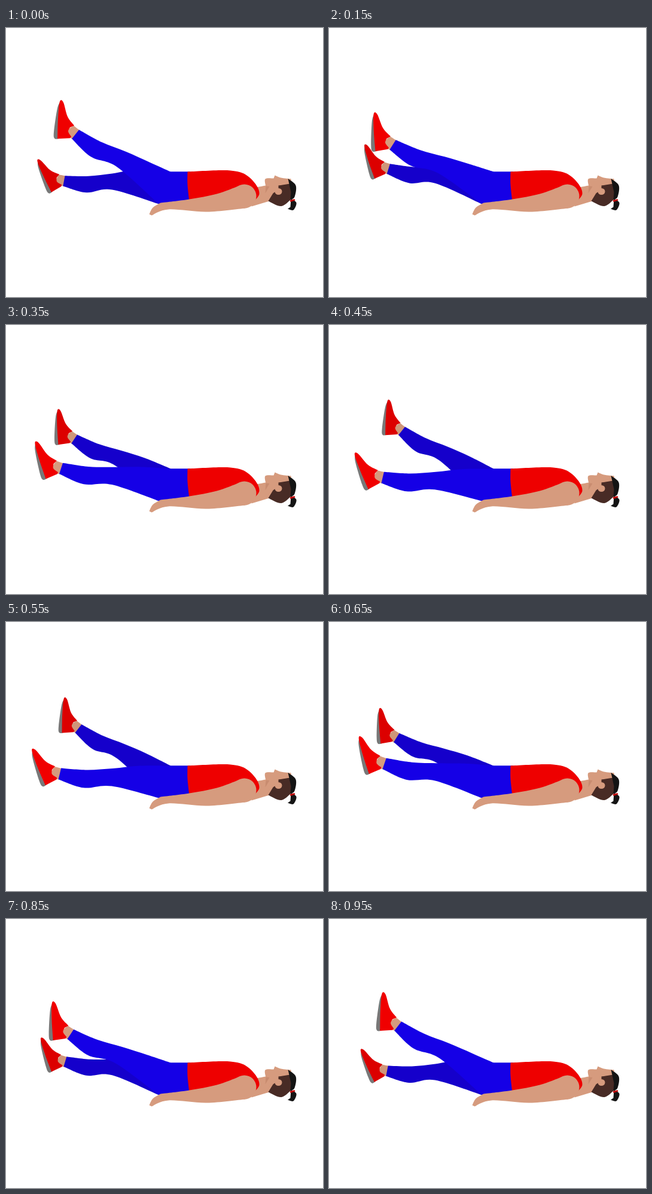
An HTML page with a canvas for the animation above (1000 ms loop, 530 px wide and 450 px high).

```html
<!DOCTYPE html>
<html lang="en">
<head>
<meta charset="utf-8">
<title>Flutter kicks</title>
<style>
html, body { margin: 0; width: 100%; height: 100%; overflow: hidden; background: #fff; }
canvas { display: block; }
</style>
</head>
<body>
<canvas id="stage" width="530" height="450"></canvas>
<script>
const ctx = document.getElementById('stage').getContext('2d');
const LOOP = 1000, STEP = 50;
const SKIN = '#d69b7e', RED = '#ee0000', BLACK = '#141414', HAIR = '#482b25';

const near = { x: 276, y: 275, scale: 1, pants: '#1500e6', shoe: '#f00000', skin: SKIN };
const far = { x: 268, y: 266, scale: .915, pants: '#1500cb', shoe: '#dc0000', skin: '#cf9679' };

// 1 = near leg up, -1 = near leg down
function swing(t) {
  const p = 2 * Math.PI * (t + 7) / LOOP;
  return Math.cos(p) + .02 * Math.cos(3 * p) - .03;
}

// Fills a closed shape made of smooth runs that meet in corners
function fill(color, ...runs) {
  ctx.beginPath();
  for (const run of runs) {
    ctx.lineTo(...run[0]);
    for (let i = 0; i < run.length - 1; i++) {
      const b = run[i], c = run[i + 1], a = run[i - 1] || b, d = run[i + 2] || c;
      ctx.bezierCurveTo(b[0] + (c[0] - a[0]) / 6, b[1] + (c[1] - a[1]) / 6,
        c[0] - (d[0] - b[0]) / 6, c[1] - (d[1] - b[1]) / 6, c[0], c[1]);
    }
  }
  ctx.fillStyle = color;
  ctx.fill();
}

function oval(color, x, y, rx, ry = rx) {
  ctx.beginPath();
  ctx.ellipse(x, y, rx, ry, 0, 0, 2 * Math.PI);
  ctx.fillStyle = color;
  ctx.fill();
}

// Foot and leg are given relative to the hip joint, with the leg raised
function drawFoot(leg, turn) {
  ctx.save();
  ctx.translate(leg.x, leg.y);
  ctx.rotate(turn);
  ctx.scale(leg.scale, leg.scale);
  fill(leg.skin, [[-163, -113], [-153, -105]], [[-165, -90], [-173, -97], [-172, -107]]);
  fill('#787878', [[-184, -154], [-190, -142], [-196, -103], [-195, -91.5], [-188, -91]]);
  fill(leg.shoe, [[-190, -91], [-189, -125], [-186, -153], [-180, -152], [-173, -128], [-162, -113]],
    [[-169, -110], [-172, -103], [-167, -94.5]], [[-169, -92]]);
  ctx.restore();
}

function drawLeg(leg, degrees) {
  const turn = degrees * Math.PI / 180;
  drawFoot(leg, turn);
  // Points close to the hip follow the rotation less
  const place = ([x, y]) => {
    const r = Math.hypot(x, y), a = Math.atan2(y, x) + turn * Math.min(1, r / 75);
    return [leg.x + leg.scale * r * Math.cos(a), leg.y + leg.scale * r * Math.sin(a)];
  };
  const top = [[-154, -106], [-116, -85], [-76, -69], [-36, -51]].map(place);
  const bottom = [[-90, -43], [-134, -60.5], [-166, -91]].map(place);
  fill(leg.pants, [...top, [275, 240]], [[308, 240]], [[308, 290]], [[255, 294], ...bottom]);
}

function drawHead() {
  fill(SKIN, [[412, 267], [434, 263]], [[446, 274], [440, 289]], [[410, 298]]);
  fill(SKIN, [[434, 265], [433, 252], [447, 251]], [[449, 246], [459, 250], [476, 252]],
    [[480, 280]], [[440, 284]]);
  fill('#c88c70', [[434, 264], [440, 264.5]], [[433, 276]]);
  fill(HAIR, [[455, 263], [475, 260]], [[478, 284], [460, 297.5], [438, 289]], [[446, 276], [455, 270]]);
  oval(SKIN, 455, 273, 6, 5.5);
  fill(BLACK, [[471, 251.5], [484, 263], [482, 282], [475, 287]], [[476, 274], [471, 251.5]]);
  fill(BLACK, [[476, 285], [485, 292], [480, 304], [470.5, 302]], [[475, 299], [476, 285]]);
  fill('#c40c0c', [[474, 287.5]], [[482, 285.5]], [[483, 288]], [[475, 290.5]]);
}

function drawTorso() {
  fill(RED, [[303, 240], [375, 238], [406, 249], [423, 277], [399, 300.5]], [[306, 290], [303, 262], [303, 240]]);
  oval(SKIN, 398, 281, 20);
  fill(SKIN, [[258, 292], [306, 286], [352, 277], [388, 264]],
    [[400, 301], [335, 307], [271, 303], [243, 313]], [[239, 311], [245, 300], [258, 292]]);
}

function frame(now) {
  const v = swing(Math.floor(now % LOOP / STEP) * STEP);
  ctx.fillStyle = '#fff';
  ctx.fillRect(0, 0, 530, 450);
  ctx.save();
  ctx.translate(.5, .5);
  drawLeg(far, -14.3 - 13.9 * v);
  drawLeg(near, -12.7 + 12.6 * v);
  drawHead();
  drawTorso();
  ctx.restore();
}

let start;
function tick(now) {
  start ??= now;
  frame(now - start);
  requestAnimationFrame(tick);
}
frame(0);
requestAnimationFrame(tick);
</script>
</body>
</html>
```
